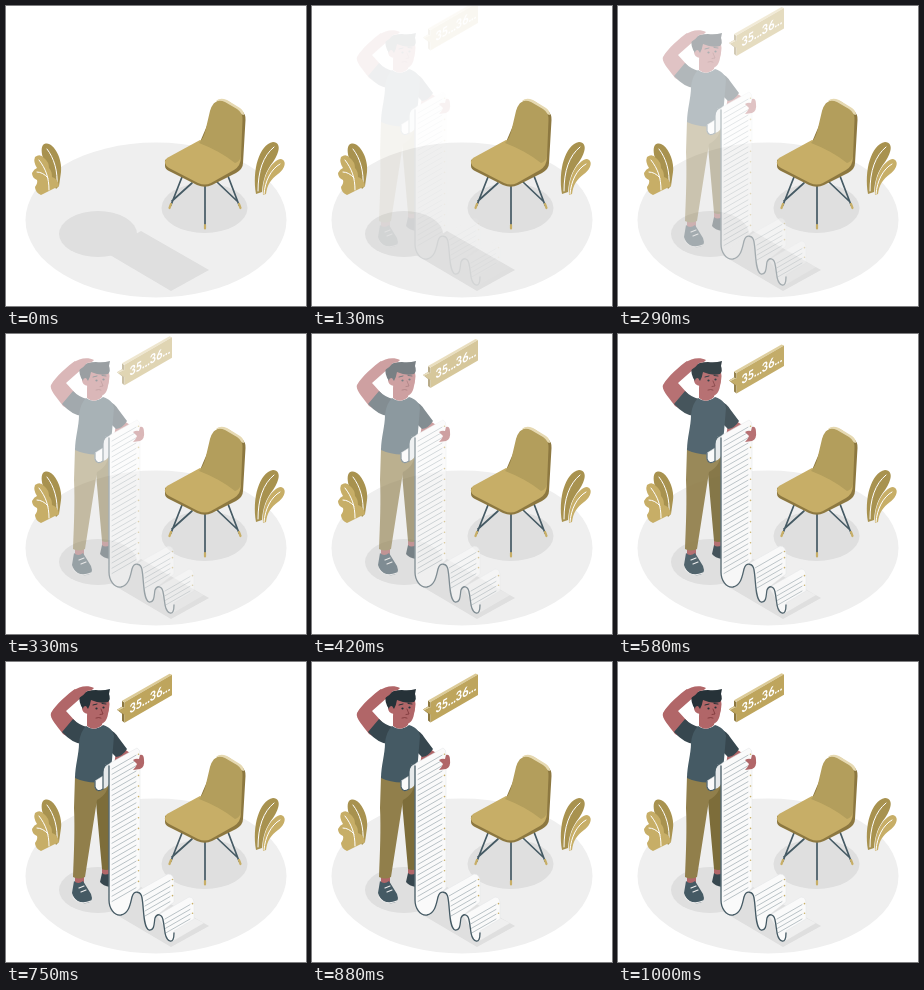
Animation, 300 px wide and 300 px high, one loop 1040 ms. Source, as an HTML page:

```html
<!DOCTYPE html>
<html lang="en">
<head>
<meta charset="utf-8">
<title>Counting by the chair</title>
<style>
  html, body { margin: 0; width: 100%; height: 100%; overflow: hidden; background: #fff; }
  svg { display: block; width: 100vw; height: 100vh; }
  .line { fill: none; stroke-linecap: round; stroke-linejoin: round; }
  .vein { stroke: #fff; stroke-width: 1; }
  .sheet { fill: #fafafa; stroke: #e2e5e6; stroke-width: .5; }
  .dark { fill: #37474f; }
  .skin { fill: #b16668; }
  .shirt { fill: #455a64; }
</style>
</head>
<body>
<svg viewBox="0 0 300 300">
  <ellipse cx="150" cy="214" rx="130.5" ry="77.5" fill="#efefef"/>
  <g fill="#dfdfdf">
    <ellipse cx="92" cy="228" rx="39" ry="23"/>
    <path d="M104 249L165 285L203 264L135 225L128 229Z"/>
    <ellipse cx="198.500" cy="202" rx="43" ry="25"/>
  </g>

  <g id="plants">
    <path fill="#a8924f" d="M50 183C42 166 32 146 37 139C45 132 57 151 55 166L53 180Z"/>
    <path class="line vein" d="M41 143C48 152 52 165 51 180"/>
    <path fill="#c7ae67" d="M35 189Q29 186 29 181Q32 177 31 174Q26 172 26 167Q28 163 31 162Q27 156 29 151Q34 147 38 152Q43 156 43 162Q46 165 46 171Q52 173 53 180Z"/>
    <path class="line vein" d="M33 154C40 163 43 172 43 184M31 166Q37 166 42 172"/>
    <path fill="#a8924f" d="M250 188C246 164 253 139 267 136C277 137 272 149 267 156C260 165 257 173 256 186Z"/>
    <path class="line vein" d="M268 141C257 150 252 165 252 185"/>
    <path fill="#c7ae67" d="M257 189C256 170 266 154 275 153C282 155 278 164 272 168C265 173 261 179 260 188Z"/>
    <path class="line vein" d="M274 158C265 163 259 175 258 188"/>
  </g>

  <g id="chair">
    <path class="line" stroke="#455a64" stroke-width="1.700" d="M176 171L165 199M186 177L166 195M222 170L233 199M211 176L231 195M199 179V220"/>
    <path class="line" stroke="#c7ae67" stroke-width="2.200" d="M165 198L163.500 202M233 198L234.500 202M199 219V222.500"/>
    <path fill="#8d7840" d="M159 154V160Q159 163 163 165L191 179Q199 182.500 206 179L230 167Q237 163 237 157L239.500 114Q240 108 235 104L222 95L212 94L194 136Z"/>
    <path fill="#e6d9b2" d="M210 95Q214 91 221 94L234 102Q238 105 238 109L234 108L215 96Z"/>
    <path fill="#c7ae67" d="M161 152L194 134L235 150Q235 160 228 164L205 177Q199 180 192 177L163 162Q156 157 161 152Z"/>
    <path fill="#b39e5c" d="M193 137Q198 132 200 122L204 105Q208 91 219 96L231 103Q237 107 236.500 114L235 151Q233 156 229 157Q214 145 193 137Z"/>
  </g>

  <g id="scene">
    <g id="person">
      <path class="skin" d="M96 205H103V216H96ZM69 213H78V224H69Z"/>
      <path class="dark" d="M96 211Q99 214 104 211V225Q97 224 94 220Z"/>
      <path fill="#7d6d3a" d="M85 116H104V207Q100 209 96 207L90 140Z"/>
      <path fill="#917f4b" d="M69 114L103 117Q103 132 91 138L79 215Q73 218 67 215C68 190 69 167 68 146Z"/>
      <path class="shirt" d="M68 219Q72 223 77 219L85 232Q88 240 81 241Q72 242 68 236L66 231Z"/>
      <path class="line" stroke="#eee" stroke-width="1.200" d="M67 235C71 241 78 242 85 239M73 226L78 224M75 230L80 228"/>
      <path class="skin" d="M57 72C52 65 43 56 45 51C50 42 62 32 69 27L77 34L60 49L70 60L64 76Z"/>
      <path class="skin" d="M110 91L118 87L129 94L126 105L108 102Z"/>
      <path class="dark" d="M56 70L67 57Q73 63 81 65L76 82Q66 81 56 70ZM103 67Q109 70 112 75L121 87Q117 94 110 95L103 88Z"/>
      <path class="shirt" d="M80 64Q88 70 97 63C103 65 107 68 108 74L106 98L103 119Q84 123 69 116C69 104 73 92 73 81Q74 70 80 64Z"/>
      <path class="skin" d="M81 54V64Q88 70 96 63V58L102 51Q105 40 102 36H82Z"/>
      <path class="skin" d="M81 36H102Q104 44 102 52C101 59 97 63 92 62Q84 60 82 52Q76 51 76 46Q78 43 81 44Z"/>
      <path fill="#263238" d="M74 33Q80 28 90 28Q97 29 104 27L103 32Q105 37 102 40Q94 42 85 38Q84 44 82 47L80 44Q77 44 77 47Q72 40 74 33Z"/>
      <path class="skin" d="M67 29C73 24 82 23 88 26Q86 29 81 29Q78 33 73 36Z"/>
      <g fill="#263238"><circle cx="90.500" cy="46.500" r="1.100"/><circle cx="97.500" cy="45.500" r="1.100"/></g>
      <path class="line" stroke="#263238" stroke-width="1" d="M87 43L91 42M96 41.500L100 42"/>
      <path class="line" stroke="#7a3538" stroke-width=".8" d="M95 47L97 52L94 52.500M90 56Q93 55 95 56"/>
    </g>

    <g id="paper">
      <path fill="#efefef" d="M150 252L188 256L198 261L167 279Z"/>
      <path fill="#e6e9ea" d="M104 101Q97 103 97 110V127Q103 126 104 118Z"/>
      <path class="sheet" d="M89 119L97 114V127Q91 131 89 125Z"/>
      <path class="line" stroke="#455a64" stroke-width="1.200" d="M104 101Q97 103 97 110V127Q91 131 89 125V119"/>
      <path class="sheet" id="tall" d="M103 104Q103 101 106 100L131 86Q134 87 134 92V226L126 234C124 246 122 252 115 253C108 254 103 246 103 238Z"/>
      <path class="sheet" id="middle" d="M130 230L162 212Q168 212 168 220V240L150 254C149 264 147 269 143 268C137 266 138 250 137 240Q136 231 130 230Z"/>
      <path class="sheet" id="short" d="M152 253L183 235Q188 235 188 242V257L168 269Q168 280 164 279C158 277 159 268 158 260Q157 254 152 253Z"/>
      <g id="rows" class="line" stroke="#a3afb5" stroke-width=".75"></g>
      <path class="line" stroke="#455a64" stroke-width="1.300" d="M103 104V238C103 246 108 254 115 253C123 251 124 243 126 235C128 228 135 229 136 236C138 246 137 266 143 268C149 269 148 260 149 256C151 251 156 252 157 258C159 266 158 277 164 279Q168 280 168 271"/>
      <path class="skin" d="M127 98Q130 96 133 97L134 93Q138 92 138 98Q139 105 134 107L127 108Q130 105 131 102Z"/>
    </g>

    <g id="bubble">
      <path fill="#8d7840" d="M116 39L118.500 41V61L116 59V52L111 48L116 45Z"/>
      <path fill="#dccb98" d="M116 39L163.500 12L166 13L118.500 40.500ZM111 48L116 45L118.500 46L112.500 49Z"/>
      <path fill="#bea55d" d="M118.500 40.500L166 13V33.500L118.500 61V53L112.500 49L118.500 46Z"/>
      <text transform="matrix(.87 -.5 0 1 123.500 52)" fill="#fff" font-family="Lato, 'Open Sans', sans-serif" font-weight="800" font-size="12.500">35...36...</text>
    </g>
  </g>
</svg>
<script>
  const LOOP = 1040, FRAME = 1000 / 24, FADE_START = 2, FADE_STEPS = 13;
  const scene = document.getElementById('scene');
  const bubble = document.getElementById('bubble');
  const rows = document.getElementById('rows');
  const clamp = v => Math.min(1, Math.max(0, v));

  function add(name, attrs) {
    const node = document.createElementNS('http://www.w3.org/2000/svg', name);
    for (const key in attrs) node.setAttribute(key, attrs[key]);
    rows.appendChild(node);
  }

  // Slanted rows of writing, each ending near a small gold mark.
  function write(x, y, width, count, gap) {
    for (let i = 0; i < count; i++) {
      const top = y + i * gap, rise = width * 0.575;
      add('path', { d: `M${x} ${top}l${width} ${-rise}` });
      if (i % 2 === 0) {
        add('circle', { cx: x + width + 2.5, cy: top - rise - 1, r: 0.8, fill: '#c7ae67', stroke: 'none' });
      }
    }
  }
  write(106, 107, 24, 26, 5.3);
  write(137, 234, 27, 1, 5);
  write(139, 239, 25, 4, 5);
  write(159, 257, 25, 4, 4.8);

  function draw(time) {
    const frame = Math.floor((time % LOOP + 4) / FRAME);
    const shown = clamp((frame - FADE_START) / FADE_STEPS);
    const lift = clamp((frame - 15) / 9);
    scene.setAttribute('opacity', shown);
    bubble.setAttribute('transform', `translate(0 ${-18 * (1 - shown) - 0.8 * lift})`);
  }

  const start = performance.now();
  function tick() {
    draw(performance.now() - start);
    requestAnimationFrame(tick);
  }
  tick();
</script>
</body>
</html>
```
